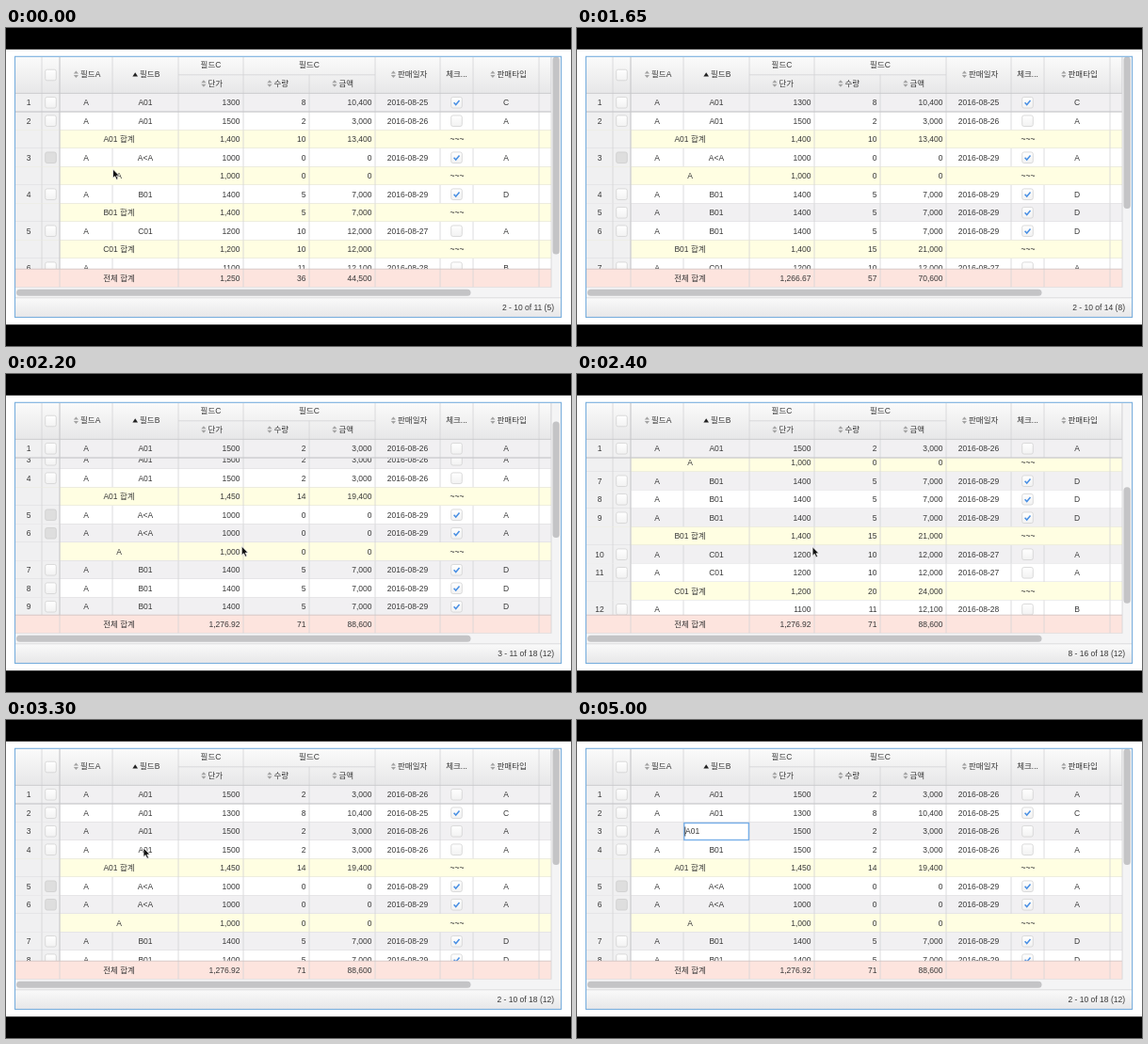
An HTML page that plays this animation: 600 px wide and 338 px high, repeating every 5050 ms.

```html
<!DOCTYPE html>
<html lang="ko">
<head>
<meta charset="utf-8">
<title>Grid</title>
<style>
  html, body { margin: 0; width: 100%; height: 100%; overflow: hidden; background: #000; }
  svg { display: block; width: 600px; height: 338px; }
  text { font: 8.5px "Liberation Sans", "Noto Sans CJK KR", "Noto Sans CJK", sans-serif; fill: #383838; }
</style>
</head>
<body>
<svg viewBox="0 0 600 338">
  <defs>
    <linearGradient id="head" x2="0" y2="1"><stop stop-color="#fafafa"/><stop offset="1" stop-color="#e7e7e8"/></linearGradient>
    <linearGradient id="box" x2="0" y2="1"><stop stop-color="#fff"/><stop offset="1" stop-color="#f2f2f2"/></linearGradient>
    <clipPath id="body"><rect x="10" y="89" width="569" height="167.2"/></clipPath>
  </defs>
  <path d="M0 22.8H600V315.3H0Z" fill="#fff"/>
  <g id="grid"></g>
  <path id="cursor" d="M0 0V9.6L2.2 7.6L3.8 11.2L5.5 10.4L3.9 7H6.9Z" fill="#111" stroke="#fff" stroke-width=".7"/>
</svg>
<script>
const LOOP = 5050, ROW = 19.5, TOP = 89, BOTTOM = 256.2, TRACK = 245;
const LINE = '#d4d4d6';
const COLS = [10, 38, 57, 113, 183, 252, 322, 392, 461, 496, 566, 579];
const grid = document.getElementById('grid');
const cursor = document.getElementById('cursor');

// key, price, quantity, day, checked, type
const ITEMS = [
  ['A01', 1300, 8, 25, true, 'C'],
  ['A01', 1500, 2, 26, false, 'A'],
  ['A<A', 1000, 0, 29, true, 'A'],
  ['B01', 1400, 5, 29, true, 'D'],
  ['C01', 1200, 10, 27, false, 'A'],
  ['', 1100, 11, 28, false, 'B']
];
// time, item, placed first
const ADDED = [[1250, 3], [1400, 5], [1550, 3], [1700, 1, true], [1800, 2], [1900, 4], [2000, 1]];
// time, row, text in the editor
const EDITS = [[3500, 4, 'A01'], [4100, 4, 'B'], [4400, 4, 'B0'], [4550, 4, 'B01'], [4700, 0, ''], [4800, 3, 'A01']];
const COMMIT = 4700;
// time, x, y
const PATH = [[0, 113.5, 150], [450, 186.5, 156], [1100, 200, 286], [1200, 202, 325], [2040, 240, 325],
  [2150, 250.3, 183], [2550, 250, 184], [2800, 250, 184], [3200, 146, 136], [3500, 146, 136]];
const SCROLL = [[2100, 0], [2200, 27], [2350, 164], [2500, 0]];

function tween(keys, t) {
  const next = keys.findIndex(k => k[0] > t);
  if (next < 0) return keys[keys.length - 1].slice(1);
  if (!next) return keys[0].slice(1);
  const a = keys[next - 1], b = keys[next];
  const p = (t - a[0]) / (b[0] - a[0]), e = p * p * (3 - 2 * p);
  return a.slice(1).map((v, i) => v + (b[i + 1] - v) * e);
}

const escape = s => String(s).replace(/</g, '&lt;');
const format = n => n.toLocaleString('en-US', { maximumFractionDigits: 2 });
const rect = (x, y, w, h, fill, more = '') => `<rect x="${x}" y="${y}" width="${w}" height="${h}" fill="${fill}" ${more}/>`;
const text = (s, x, y, anchor = 'middle') => `<text x="${x}" y="${y + 3}" text-anchor="${anchor}">${escape(s)}</text>`;
const path = (d, stroke = LINE, width = .8) => `<path d="${d}" fill="none" stroke="${stroke}" stroke-width="${width}"/>`;
const centred = (s, from, to, y) => text(s, (COLS[from] + COLS[to]) / 2, y);
const amount = (s, col, y) => text(s, COLS[col + 1] - 3.5, y, 'end');
const verticals = (cols, y, h) => path(cols.map(c => `M${COLS[c]} ${y}v${h}`).join(''));

function checkbox(x, y, checked, disabled) {
  const frame = rect(x - 5.8, y - 5.8, 11.6, 11.6, disabled ? '#dedede' : 'url(#box)', `rx="2" stroke="${disabled ? '#cdcdcd' : '#d2d2d2'}" stroke-width=".8"`);
  return frame + (checked ? path(`M${x - 2.9} ${y}l2.1 2.3l3.8 -4.6`, '#4a90e4', 1.5) : '');
}

function sums(rows) {
  const total = f => rows.reduce((s, r) => s + f(r), 0);
  return [total(r => r[1]) / rows.length, total(r => r[2]), total(r => r[1] * r[2])];
}

function rowsAt(t) {
  const rows = ITEMS.slice();
  for (const [time, item, first] of ADDED)
    if (t >= time) first ? rows.unshift(ITEMS[item]) : rows.push(ITEMS[item]);
  const rank = r => r[0] || '~';
  return rows.sort((a, b) => rank(a) < rank(b) ? -1 : rank(a) > rank(b) ? 1 : 0);
}

function dataRow(row, number, y, striped, shownKey) {
  const [key, price, count, day, checked, type] = row, mid = y + ROW / 2;
  return rect(10, y, 569, ROW, striped ? '#f1f0f2' : '#fff') + rect(10, y, 47, ROW, '#f0f0f1')
    + path(`M10 ${y + ROW}H579`) + verticals([1, 2, 3, 4, 5, 6, 7, 8, 9, 10], y, ROW)
    + centred(number, 0, 1, mid) + checkbox(47.5, mid, false, key === 'A<A')
    + centred('A', 2, 3, mid) + centred(shownKey ?? key, 3, 4, mid)
    + amount(price, 4, mid) + amount(count, 5, mid) + amount(format(price * count), 6, mid)
    + centred('2016-08-' + day, 7, 8, mid) + checkbox(478.5, mid, checked) + centred(type, 9, 10, mid);
}

function sumRow(label, values, y, fill, side, cols) {
  const mid = y + ROW / 2;
  return rect(10, y, 569, ROW, fill) + rect(10, y, 47, ROW, side)
    + path(`M10 ${y + ROW}H579`) + verticals(cols, y, ROW)
    + centred(label, 2, 4, mid) + values.map((v, i) => amount(format(v), 4 + i, mid)).join('');
}

function sorter(x, y) {
  return `<path d="M${x - 2.6} ${y - .8}h5.2l-2.6 -3zM${x - 2.6} ${y + .8}h5.2l-2.6 3z" fill="#a2a2a2"/>`;
}

function header() {
  const labels = [['필드A', 79, 49.2], ['단가', 214.5, 59], ['수량', 284.5, 59], ['금액', 353.5, 59], ['판매일자', 416, 49.2], ['판매타입', 521.5, 49.2]];
  return rect(10, 31, 580, 38.5, 'url(#head)')
    + verticals([1, 2, 3, 4, 5, 7, 8, 9, 10, 11], 31, 38.5)
    + path('M183 49.8H392M322 49.8V69.5') + path('M10 69.4H579', '#c4c4c7')
    + checkbox(47.5, 50) + labels.map(([s, x, y]) => text(s, x, y, 'start') + sorter(x - 4.6, y)).join('')
    + text('필드B', 142, 49.2, 'start') + '<path d="M134.4 51.6h5.6l-2.8 -4.4z" fill="#222"/>'
    + centred('필드C', 4, 5, 39.3) + centred('필드C', 5, 7, 39.3) + centred('체크...', 8, 9, 49.2);
}

function editor(value, y, caretFirst) {
  const caret = caretFirst ? 114.8 : 115.4 + 5.2 * value.length;
  return rect(113.8, y + 1, 68.6, ROW - 1.5, '#fff', 'stroke="#78afe8" stroke-width="1.4"')
    + text(value, 115, y + ROW / 2, 'start') + path(`M${caret} ${y + 5}v10`, '#222', .8);
}

function render(t) {
  const rows = rowsAt(t), scroll = tween(SCROLL, t)[0];
  const edit = EDITS.filter(e => t >= e[0]).pop();
  let body = '', frozen = '', input = '', y = TOP - scroll, lines = 0;

  rows.forEach((row, i) => {
    const number = i + 1, shown = number === 4 && t >= COMMIT ? 'B01' : undefined;
    const striped = lines % 2 === 0;
    if (!i) frozen = dataRow(row, 1, TOP - ROW, striped);
    else {
      if (edit && edit[1] === number) input = editor(edit[2], y, edit[2] === 'A01');
      body += dataRow(row, number, y, striped, shown);
      y += ROW;
    }
    lines++;
    const next = rows[i + 1];
    if (!next || next[0] !== row[0]) {
      const label = row[0] === 'A<A' ? 'A' : row[0] + ' 합계';
      body += sumRow(label, sums(rows.filter(r => r[0] === row[0])), y, '#fffee2', '#f0f0f1', [1, 2, 4, 5, 6, 7, 10])
        + centred('~~~', 7, 10, y + ROW / 2);
      y += ROW;
      lines++;
    }
  });

  const view = BOTTOM - TOP, content = (lines - 1) * ROW, thumb = TRACK * view / content;
  const thumbY = 30.5 + scroll / (content - view) * (TRACK - thumb);
  const first = 2 + Math.floor(scroll / ROW);
  const html = rect(10, 31, 580, 277, '#fff')
    + `<g clip-path="url(#body)">${body}${input}</g>` + frozen + header()
    + path('M10 89H579', '#c0c1c4') + path('M57 31V256', '#c8c8cb')
    + sumRow('전체 합계', sums(rows), BOTTOM, '#fde4de', '#fde4de', [2, 4, 5, 6, 7, 8, 9, 10])
    + path('M10 256.2H579', '#cfc0be')
    + rect(579, 31, 11, 256, '#f4f4f5') + path('M579 31V287') + rect(10, 275.8, 580, 11, '#f4f4f5')
    + rect(580.5, thumbY, 7.3, thumb, '#c4c4c6', 'rx="3.5"') + rect(11, 277.7, 482.5, 7, '#c4c4c6', 'rx="3.5"')
    + rect(10, 286.8, 580, 20.7, 'url(#head)') + path('M10 286.8H590')
    + text(`${first} - ${first + 8} of ${lines} (${rows.length - 1})`, 582, 296.5, 'end')
    + rect(9.5, 30.3, 580.1, 277.2, 'none', 'stroke="#78aedd" stroke-width="1.1"');

  if (html !== render.last) grid.innerHTML = render.last = html;
  const [x, cy] = tween(PATH, t);
  cursor.setAttribute('transform', `translate(${x} ${cy})`);
  cursor.style.display = cy > 305 || t >= EDITS[0][0] ? 'none' : '';
}

const start = performance.now();
function frame() {
  const t = (performance.now() - start) % LOOP;
  render(Math.floor(t / 50) * 50);
  requestAnimationFrame(frame);
}
frame();
</script>
</body>
</html>
```
